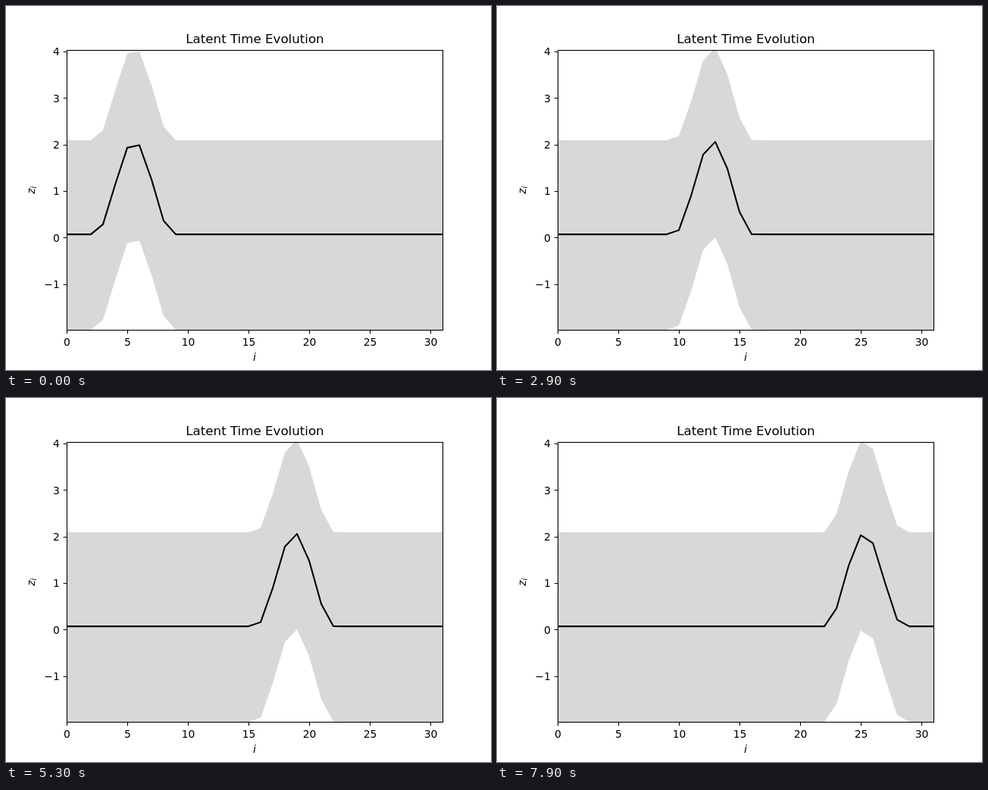
Recreate the animation shown at these times as an HTML page. Size 640x480 px, loop 8 s.

```html
<!DOCTYPE html>
<html lang="en">
<head>
<meta charset="utf-8">
<title>Latent Time Evolution</title>
<style>
  html, body { margin: 0; width: 100%; height: 100%; overflow: hidden; background: #fff; }
  svg { display: block; font: 13.89px "DejaVu Sans", sans-serif; }
  .axes { fill: none; stroke: #000; stroke-width: 1.11; }
  .math { font-style: italic; }
</style>
</head>
<body>
<svg width="640" height="480" viewBox="0 0 640 480">
  <clipPath id="plot"><rect x="80" y="58" width="496" height="370"/></clipPath>
  <g clip-path="url(#plot)">
    <path id="band" fill="#d8d8d8"/>
    <path id="mean" fill="none" stroke="#000" stroke-width="2.08" stroke-linejoin="round"/>
  </g>
  <path id="ticks" class="axes"/>
  <rect class="axes" x="80.5" y="58.5" width="496" height="369"/>
  <g id="labels"></g>
  <text x="328.5" y="49" font-size="16.67" text-anchor="middle">Latent Time Evolution</text>
  <text class="math" x="328" y="468" text-anchor="middle">i</text>
  <text class="math" transform="translate(38 247.7) rotate(-90)">z<tspan dy="2.2" font-size="9.72">i</tspan></text>
</svg>
<script>
const $ = id => document.getElementById(id);
const LOOP = 8000, STEP = 100, LAST = 31;
const BASE = 301.1, ABOVE = 124.2, BELOW = 125.8;
const PEAK = 123, CENTER = 5.56, REACH = 3.25;

const px = i => 80 + 16 * i;
const py = z => 305.2 - 61.3 * z;

// Raised-cosine bump; u is the distance along the axis in the pulse's own frame.
function bump(u) {
  const d = Math.min(1, Math.abs(u - CENTER) / REACH);
  return PEAK * Math.cos(d * Math.PI / 2) ** 2;
}

let ticks = "", labels = "";
for (let i = 0; i < LAST; i += 5) {
  ticks += `M${px(i) + .5} 427.5v4.86`;
  labels += `<text x="${px(i) + .5}" y="448" text-anchor="middle">${i}</text>`;
}
for (let z = -1; z <= 4; z++) {
  const y = py(z);
  ticks += `M80.5 ${Math.round(y) + .5}h-4.86`;
  labels += `<text x="70.8" y="${Math.round(y + 5.3)}" text-anchor="end">${String(z).replace("-", "\u2212")}</text>`;
}
$("ticks").setAttribute("d", ticks);
$("labels").innerHTML = labels;

function draw() {
  const shift = Math.floor(performance.now() % LOOP / STEP) / 4;
  const points = Array.from({ length: LAST + 1 }, (_, i) => [px(i), BASE - bump(i - shift)]);
  const offset = dy => points.map(([x, y]) => [x, y + dy]);
  $("mean").setAttribute("d", "M" + points.join("L"));
  $("band").setAttribute("d", "M" + [...offset(-ABOVE), ...offset(BELOW).reverse()].join("L") + "Z");
  requestAnimationFrame(draw);
}
draw();
</script>
</body>
</html>
```
